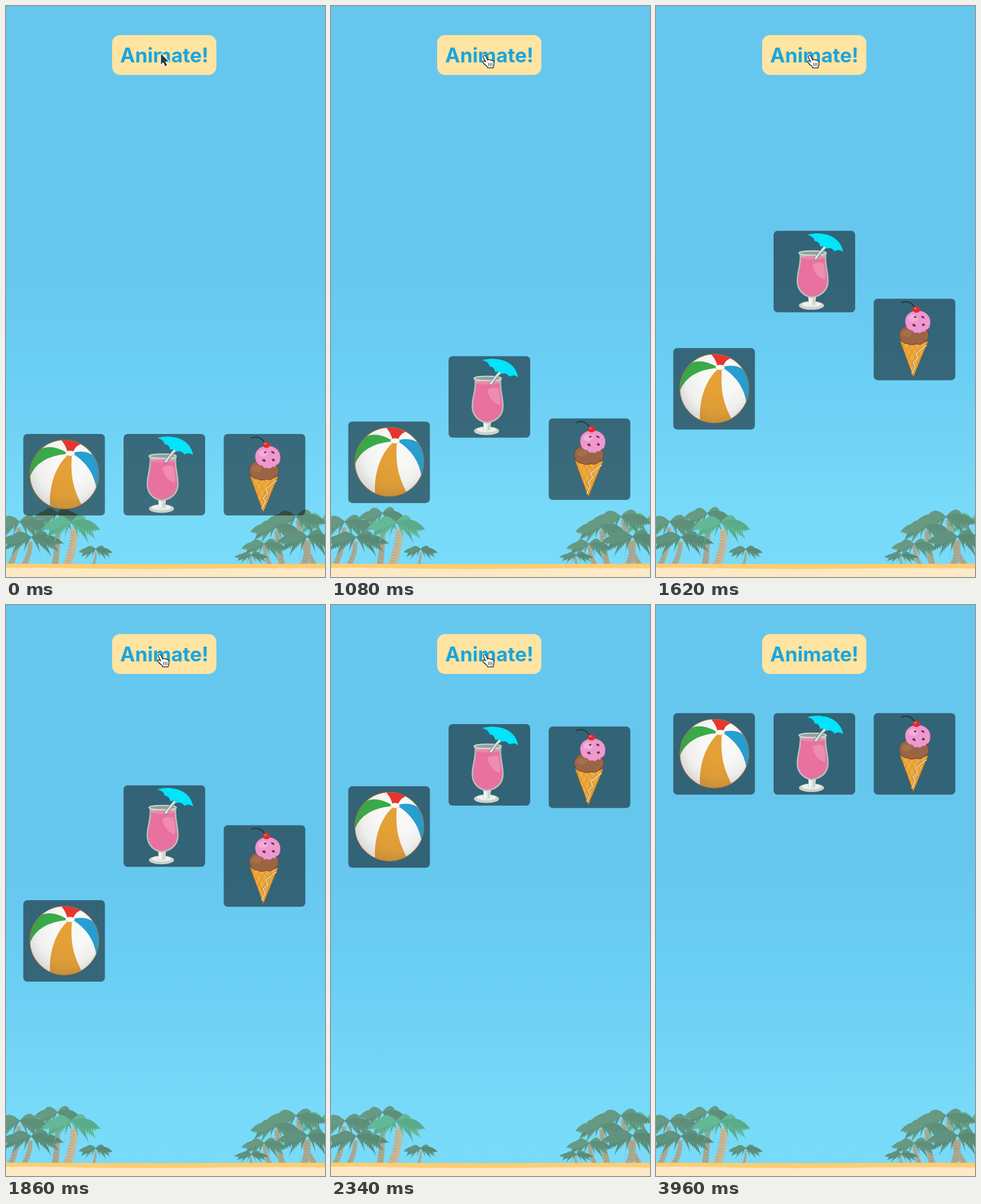
An HTML page with a canvas for the animation above (4.02 s loop, 559 by 1002 pixels).

```html
<!DOCTYPE html>
<html lang="en">
<head>
<meta charset="utf-8">
<title>Beach cards</title>
<style>
html, body { margin: 0; width: 100%; height: 100%; overflow: hidden; background: #66c7ee; }
canvas { display: block; }
</style>
</head>
<body>
<canvas id="stage" width="559" height="1002"></canvas>
<script>
const W = 559, H = 1002, LOOP = 4020, STEP = 60;
const ctx = document.getElementById('stage').getContext('2d');

function fill(c, path, color) {
  c.fillStyle = color;
  c.fill(typeof path === 'string' ? new Path2D(path) : path);
}

function stroke(c, path, color, width) {
  c.strokeStyle = color;
  c.lineWidth = width;
  c.lineCap = c.lineJoin = 'round';
  c.stroke(typeof path === 'string' ? new Path2D(path) : path);
}

function oval(x, y, rx, ry = rx) {
  const p = new Path2D();
  p.ellipse(x, y, rx, ry, 0, 0, Math.PI * 2);
  return p;
}

function box(x, y, w, h, r) {
  const p = new Path2D();
  p.roundRect(x, y, w, h, r);
  return p;
}

// CSS-style cubic easing with control points (x1, 0) and (x2, 1)
function bezier(x1, x2) {
  return u => {
    if (u <= 0) return 0;
    if (u >= 1) return 1;
    let lo = 0, hi = 1, s = 0.5;
    for (let i = 0; i < 24; i++) {
      s = (lo + hi) / 2;
      const x = 3 * (1 - s) * (1 - s) * s * x1 + 3 * (1 - s) * s * s * x2 + s * s * s;
      if (x < u) lo = s; else hi = s;
    }
    return s * s * (3 - 2 * s);
  };
}
const easeIn = bezier(0.42, 1), easeOut = bezier(0, 0.58), easeInOut = bezier(0.42, 0.58);

// ---------- scenery ----------

// One leaf: a smooth upper arc and a serrated lower edge
function frond(c, x, y, tx, ty, lift, thick, color) {
  const cx = x + (tx - x) * 0.6, cy = Math.min(y, ty) - lift, n = 20;
  const at = t => [
    (1 - t) * (1 - t) * x + 2 * t * (1 - t) * cx + t * t * tx,
    (1 - t) * (1 - t) * y + 2 * t * (1 - t) * cy + t * t * ty
  ];
  c.beginPath();
  c.moveTo(x, y);
  c.quadraticCurveTo(cx, cy, tx, ty);
  const side = Math.sign(tx - x);
  for (let i = n - 1; i > 0; i--) {
    const t = i / n, [px, py] = at(t);
    const d = thick * Math.sin(Math.PI * Math.pow(t, 0.9)) * (i % 2 ? 1 : 0.72);
    c.lineTo(px + side * d * 0.15, py + d);
  }
  c.closePath();
  c.fillStyle = color;
  c.fill();
}

function palm(c, x, y, w, h, [light, dark]) {
  const tips = [[-0.25, 1], [0.3, 1], [-0.6, 0.9], [0.62, 0.95], [-0.55, -0.1],
    [0.5, -0.15], [-0.85, 0.65], [0.85, 0.7], [-1, 0.25], [1, 0.3]];
  tips.forEach(([dx, dy], i) =>
    frond(c, x, y, x + dx * w, y + dy * h, h * 0.34, h * 0.5, i % 3 ? light : dark));
}

function trunk(c, x, y, bx, by, w, color = '#a9aa93') {
  c.beginPath();
  c.moveTo(x - w * 0.3, y);
  c.quadraticCurveTo(x - w * 0.2, (y + by) / 2, bx - w / 2, by);
  c.lineTo(bx + w / 2, by);
  c.quadraticCurveTo(x + w * 0.5, (y + by) / 2, x + w * 0.4, y);
  c.fillStyle = color;
  c.fill();
  for (let ty = y + 5; ty < by; ty += 5) {
    const k = (ty - y) / (by - y), mx = x + (bx - x) * k;
    stroke(c, `M${mx - w * 0.25} ${ty}l${w * 0.5} 1.5`, 'rgba(120,112,92,.4)', 0.8);
  }
}

function makeScene() {
  const cv = document.createElement('canvas');
  cv.width = W;
  cv.height = H;
  const c = cv.getContext('2d');

  const sky = c.createLinearGradient(0, 0, 0, H);
  [[0, '#66c7ee'], [0.43, '#66c7ee'], [0.6, '#69ccf3'], [0.75, '#70d3f6'],
    [0.88, '#78daf9'], [1, '#79dbfa']].forEach(s => sky.addColorStop(...s));
  c.fillStyle = sky;
  c.fillRect(0, 0, W, H);

  const grey = ['#669a83', '#5d8f7a'], deep = ['#609380', '#588a76'], bright = ['#63b895', '#5aab89'];
  trunk(c, 22, 915, 8, 980, 11);
  trunk(c, 90, 900, 86, 980, 12);
  palm(c, 90, 890, 42, 38, grey);
  palm(c, 24, 905, 54, 42, grey);
  trunk(c, 42, 940, 32, 980, 11);
  palm(c, 44, 932, 57, 38, deep);
  trunk(c, 118, 918, 107, 980, 17, '#c6b899');
  palm(c, 114, 906, 51, 44, bright);
  trunk(c, 157, 958, 154, 979, 5);
  palm(c, 157, 953, 30, 22, deep);

  trunk(c, 512, 902, 540, 980, 12);
  palm(c, 554, 900, 42, 42, bright);
  palm(c, 508, 896, 54, 42, grey);
  trunk(c, 474, 920, 484, 980, 12);
  palm(c, 472, 913, 44, 40, grey);
  trunk(c, 528, 938, 522, 980, 14);
  palm(c, 528, 931, 54, 42, deep);
  trunk(c, 452, 946, 462, 980, 9);
  palm(c, 452, 944, 40, 32, grey);
  trunk(c, 428, 966, 430, 980, 5);
  palm(c, 430, 963, 30, 18, deep);

  fill(c, 'M0 978.5Q280 980 559 978.5V1002H0Z', '#fdcd73');
  fill(c, 'M0 986C90 985 170 989 280 988S470 986 559 987V1002H0Z', '#fde9c6');

  fill(c, box(186, 51, 182.6, 70, 14), '#ffe4a2');
  c.fillStyle = '#1ba5dc';
  c.font = '700 35px Inter, sans-serif';
  c.textAlign = 'center';
  c.fillText('Animate!', 277.5, 99);
  return cv;
}

// ---------- card pictures ----------

function ball(c) {
  const rim = oval(72, 71, 60.5);
  c.save();
  c.clip(rim);
  fill(c, rim, '#f8f8f6');
  fill(c, 'M77 30Q74 19 65 9L84 0L103 17Q92 20 88 30Z', '#e8352f');
  fill(c, 'M75 32Q50 18 31 26L-9 50L12 74Q26 40 75 35Z', '#3aac49');
  fill(c, 'M90 32Q112 28 124 39L142 70L128 95Q122 58 89 36Z', '#279fd2');
  fill(c, 'M77 38C58 55 44 90 47 130L72 140L103 126C90 100 82 80 85 38Z', '#e5a036');
  const shade = c.createRadialGradient(84, 50, 30, 76, 62, 76);
  shade.addColorStop(0, 'rgba(70,70,70,0)');
  shade.addColorStop(0.55, 'rgba(70,70,70,.05)');
  shade.addColorStop(1, 'rgba(70,70,70,.22)');
  fill(c, rim, shade);
  c.restore();
  fill(c, oval(82, 34, 8, 4.5), '#fffdf6');
  stroke(c, oval(82, 34, 8, 4.5), '#d8b58a', 0.8);
  stroke(c, rim, '#a5713c', 1.1);
}

function drink(c) {
  const bowl = 'M46 40C48 60 41 70 41 88C41 106 54 116 67 117C82 116 96 106 96 88C96 70 90 60 92 40Z';
  fill(c, oval(66.5, 131, 22, 7.5), '#cbd3cb');
  fill(c, oval(66.5, 129, 17, 4.5), '#eef1ec');
  fill(c, 'M60 115H75Q72 123 75 130Q67 134 59 130Q63 123 60 115Z', '#dfe5de');
  stroke(c, 'M64 119V129', '#ffffff', 2.5);
  stroke(c, 'M71 119V129', '#aab8b0', 1.2);
  fill(c, bowl, '#b9bfb9');
  fill(c, 'M48 46C49 62 43 72 43 88C43 104 55 114 67 115C81 114 94 104 94 88C94 72 89 62 90 46Z', '#e8719f');
  fill(c, oval(69, 47, 21, 3), '#ee86ac');
  fill(c, 'M68 59Q78 53 87 57Q92 72 90 86Q72 80 68 59Z', '#ee8db1');
  stroke(c, bowl, '#b9c3ba', 1.1);
  fill(c, oval(68.5, 39, 24, 3.8), '#8fa29f');
  stroke(c, oval(68.5, 39, 24, 3.8), '#d5dcd5', 1.8);
  stroke(c, 'M91 27L74 48', '#6d8587', 6);
  stroke(c, 'M91 27L74 48', '#dfe6e2', 4);
  stroke(c, 'M88 33L78 45', '#8da09f', 1);
  fill(c, 'M59 7C78 1 116 4 122 37Q114 31 107 36Q101 28 93 31Q88 25 82 28Q80 18 72 18Q71 10 59 7Z', '#00e4fc');
}

function iceCream(c) {
  const cone = new Path2D('M46.5 74Q70 86 95.5 74L69.5 137Z');
  fill(c, cone, '#f1ab3d');
  c.save();
  c.clip(cone);
  for (let i = -2; i < 9; i++) {
    const x = 26 + i * 10;
    stroke(c, `M${x} 70l34 70M${x + 22} 70l-34 70`, '#cf8a2c', 0.9);
  }
  c.restore();
  stroke(c, cone, '#a96522', 1);
  const crack = 'M92 82L74 96L77 105L69 112L73 119L67 131';
  stroke(c, crack, '#99612b', 3);
  stroke(c, crack, '#f9dda5', 2);

  const scoop = 'M45 65C44 52 57 46 70 46C85 46 97 53 96 65C96 73 90 74 86 78Q80 82 74 79Q66 83 60 79Q47 79 45 65Z';
  fill(c, scoop, '#9a6544');
  fill(c, oval(58, 61, 9, 6), '#a66f4c');
  stroke(c, scoop, '#70442d', 1);

  const top = 'M55.5 42C54 28 65 21 77 21C90 21 100 30 99 42C99 51 95 54 92 54Q90 60 86 57Q81 63 76 59Q71 62 68 56Q57 55 55.5 42Z';
  fill(c, top, '#ef98cf');
  fill(c, oval(69, 34, 8, 6), '#f5aeda');
  stroke(c, top, '#c76ba6', 0.8);
  fill(c, 'M67 45l5-1l2 5l-5-1zM84 45l4-2l2 4l-4 1zM83 30l5 1l1 4l-5-2zM70 32l4-2l1 3l-3 1z', '#63353e');

  stroke(c, 'M49 7C57 3 67 6 72 16', '#243a3b', 2);
  fill(c, oval(75, 19, 6.5, 5.5), '#e32b2c');
  fill(c, oval(73, 17, 2, 1.4), '#f57b70');
}

const cards = [
  { x: 30.3, ease: easeIn, draw: ball },
  { x: 206, ease: easeOut, draw: drink },
  { x: 381.5, ease: easeInOut, draw: iceCream }
];

function drawCard(card, t) {
  const y = 751 - 561.3 * card.ease((t - 801) / 1800);
  ctx.save();
  ctx.translate(card.x, y);
  fill(ctx, box(0, 0, 143, 143, 7), 'rgba(0,0,0,.5)');
  card.draw(ctx);
  ctx.restore();
}

// ---------- pointer ----------

function arrow(c) {
  const p = 'M0 0V18.5L4.3 14.8L7.4 21.8L10.7 20.3L7.7 13.5L13.5 13.2Z';
  stroke(c, p, '#ffffff', 2.6);
  fill(c, p, '#263f42');
}

function hand(c) {
  const p = 'M-3.5 2Q-2-1.5 1 .5L4.5 8Q7 5.5 9 8Q11.5 6.5 12.5 9Q15 8.5 15.5 12V16L14 21.5H4.5L3.5 19Q-2 15-4.5 11Q-3 8 0 10.5L1 11Z';
  fill(c, p, '#ffffff');
  stroke(c, p, '#26363c', 1.5);
  stroke(c, 'M6 13L6.5 18M9 13L9.3 18M12 13L12 18', '#26363c', 1.1);
}

function drawPointer(t) {
  const k = easeInOut((t - 2700) / 600);
  if (k >= 1) return;
  ctx.save();
  if (t < 480) {
    ctx.translate(271.5, 84);
    arrow(ctx);
  } else {
    ctx.translate(270 + 225 * k, 87 + 924 * k);
    hand(ctx);
  }
  ctx.restore();
}

const scene = makeScene();

function frame(now) {
  const t = Math.floor((now % LOOP) / STEP) * STEP;
  ctx.drawImage(scene, 0, 0);
  cards.forEach(card => drawCard(card, t));
  drawPointer(t);
  requestAnimationFrame(frame);
}
requestAnimationFrame(frame);
</script>
</body>
</html>
```
